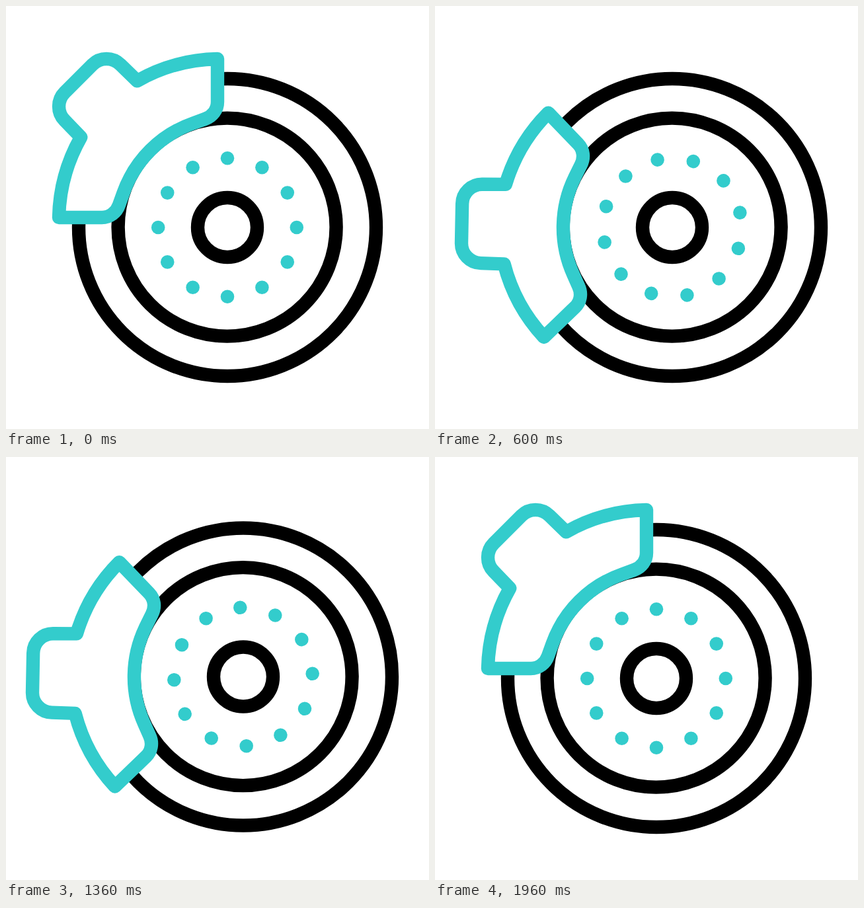
Write an HTML page that moves like this. It is 640 by 640 pixels and loops after 2000 ms.

```html
<!DOCTYPE html>
<html lang="en">
<head>
<meta charset="utf-8">
<title>Brake disc</title>
<style>
  html, body { margin: 0; width: 100%; height: 100%; overflow: hidden; background: #fff; }
  svg { display: block; width: 100%; height: 100%; }
  .ring { fill: none; stroke: #000; stroke-width: 20.4; }
  .caliper { fill: #fff; stroke: #33cccc; stroke-width: 20.4; stroke-linejoin: round; }
  .dots { fill: #33cccc; }
</style>
</head>
<body>
<svg viewBox="0 0 640 640">
  <g id="brake">
    <circle class="ring" cx="335" cy="335" r="225"/>
    <circle class="ring" cx="334.6" cy="334.6" r="165"/>
    <circle class="ring" cx="335" cy="335" r="45"/>
    <g class="dots" id="dots"></g>
    <path class="caliper" id="caliper" d="M320 80 V145 C320 157 312.5 167 301 171 L283 177.5
      A173 173 0 0 0 177.5 283 L171 301 C167 312.5 157 320 145 320 H80
      A256 256 0 0 1 113.3 198.5 L88.8 173.2 A30 30 0 0 1 88.8 130.8
      L130.8 88.8 A30 30 0 0 1 173.2 88.8 L198.5 113.3 A256 256 0 0 1 320 80 Z"/>
  </g>
</svg>
<script>
  const LOOP = 2000, STEP = 40, CENTER = 335;
  const SHIFT = 24, SWING = -65, REST = -43.9;
  const [brake, dots, caliper] = ['brake', 'dots', 'caliper'].map(id => document.getElementById(id));

  for (let i = 0; i < 12; i++) {
    const angle = i * Math.PI / 6;
    const dot = document.createElementNS('http://www.w3.org/2000/svg', 'circle');
    dot.setAttribute('cx', CENTER + 104.8 * Math.cos(angle));
    dot.setAttribute('cy', CENTER + 104.8 * Math.sin(angle));
    dot.setAttribute('r', 10.3);
    dots.append(dot);
  }

  const progress = (t, start, end) => Math.min(1, Math.max(0, (t - start) / (end - start)));
  const smooth = u => u * u * (3 - 2 * u);
  const ease = (t, start, end) => smooth(progress(t, start, end));
  const rotate = (el, deg) => el.setAttribute('transform', `rotate(${deg} ${CENTER} ${CENTER})`);

  function draw(t) {
    const away = 1 - smooth(progress(t, 1600, 1960) ** 0.75);
    const swing = SWING * ease(t, 80, 400) + (REST - SWING) * ease(t, 400, 600);
    const angle = swing * away;
    const spin = 360 * ease(t, 560, 1600);
    const x = SHIFT * ease(t, 110, 560) * away;
    const shaking = t > 600 && t < 1560;
    const y = shaking ? -2.5 * Math.cos(2 * Math.PI * (t - 1040) / 160) : 0;

    brake.setAttribute('transform', `translate(${x} ${y})`);
    rotate(caliper, angle);
    rotate(dots, angle + spin);
  }

  const begin = performance.now();
  function tick() {
    const t = (performance.now() - begin) % LOOP;
    draw(Math.floor(t / STEP) * STEP);
    requestAnimationFrame(tick);
  }
  tick();
</script>
</body>
</html>
```
